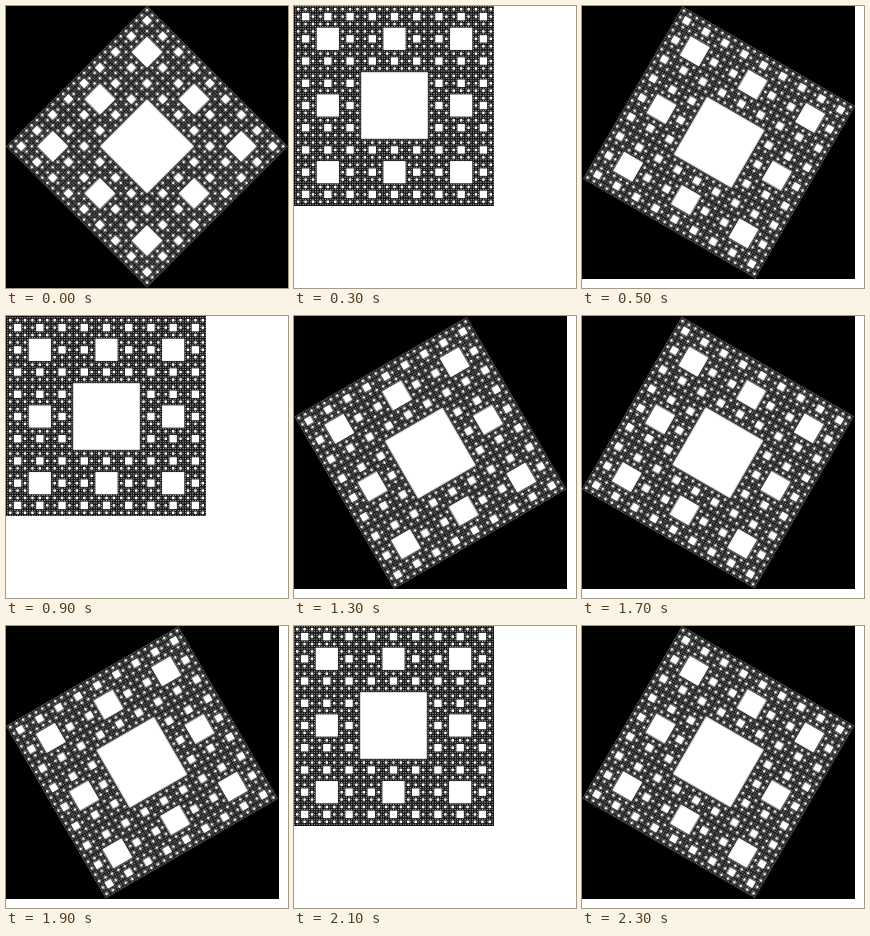
An HTML page with a canvas for the animation above (2400 ms loop, 282 by 282 pixels).

```html
<!DOCTYPE html>
<html>
<head>
<meta charset="utf-8">
<title>Turning carpet</title>
<style>
html, body { margin: 0; width: 100%; height: 100%; overflow: hidden; background: #fff; }
canvas { display: block; }
</style>
</head>
<body>
<canvas id="stage" width="282" height="282"></canvas>
<script>
const STAGE = 282, SIDE = 200, DEPTH = 6, STEP = 100, STEPS = 24;
const ctx = document.getElementById('stage').getContext('2d');

// Cut the middle ninth out of a square, then do the same to the eight around it.
function cutHoles(c, x, y, size, depth) {
  if (!depth) return;
  const third = size / 3;
  for (let i = 0; i < 3; i++)
    for (let j = 0; j < 3; j++) {
      const left = x + i * third, top = y + j * third;
      if (i === 1 && j === 1) c.fillRect(left, top, third, third);
      else cutHoles(c, left, top, third, depth - 1);
    }
}

function makeCarpet() {
  const canvas = document.createElement('canvas');
  canvas.width = canvas.height = SIDE;
  const c = canvas.getContext('2d');
  c.fillRect(0, 0, SIDE, SIDE);
  // Adding light makes holes smaller than a pixel blend to their true share of grey.
  c.globalCompositeOperation = 'lighter';
  c.fillStyle = '#fff';
  cutHoles(c, -0.5, -0.5, SIDE, DEPTH);
  return canvas;
}

const carpet = makeCarpet();

function draw(step) {
  const degrees = 45 + step * 15;
  const angle = degrees * Math.PI / 180;
  const spread = Math.abs(Math.cos(angle)) + Math.abs(Math.sin(angle));
  const box = Math.floor(SIDE * spread + 1e-6);
  ctx.fillStyle = '#fff';
  ctx.fillRect(0, 0, STAGE, STAGE);
  ctx.fillStyle = '#000';
  ctx.fillRect(0, 0, box, box);
  ctx.save();
  ctx.translate(box / 2, box / 2);
  ctx.rotate(angle);
  ctx.imageSmoothingEnabled = degrees % 90 !== 0;
  ctx.drawImage(carpet, -SIDE / 2, -SIDE / 2);
  ctx.restore();
}

const start = performance.now();
function tick() {
  const time = Math.max(0, performance.now() - start);
  draw(Math.floor(time / STEP) % STEPS);
  requestAnimationFrame(tick);
}
tick();
</script>
</body>
</html>
```
